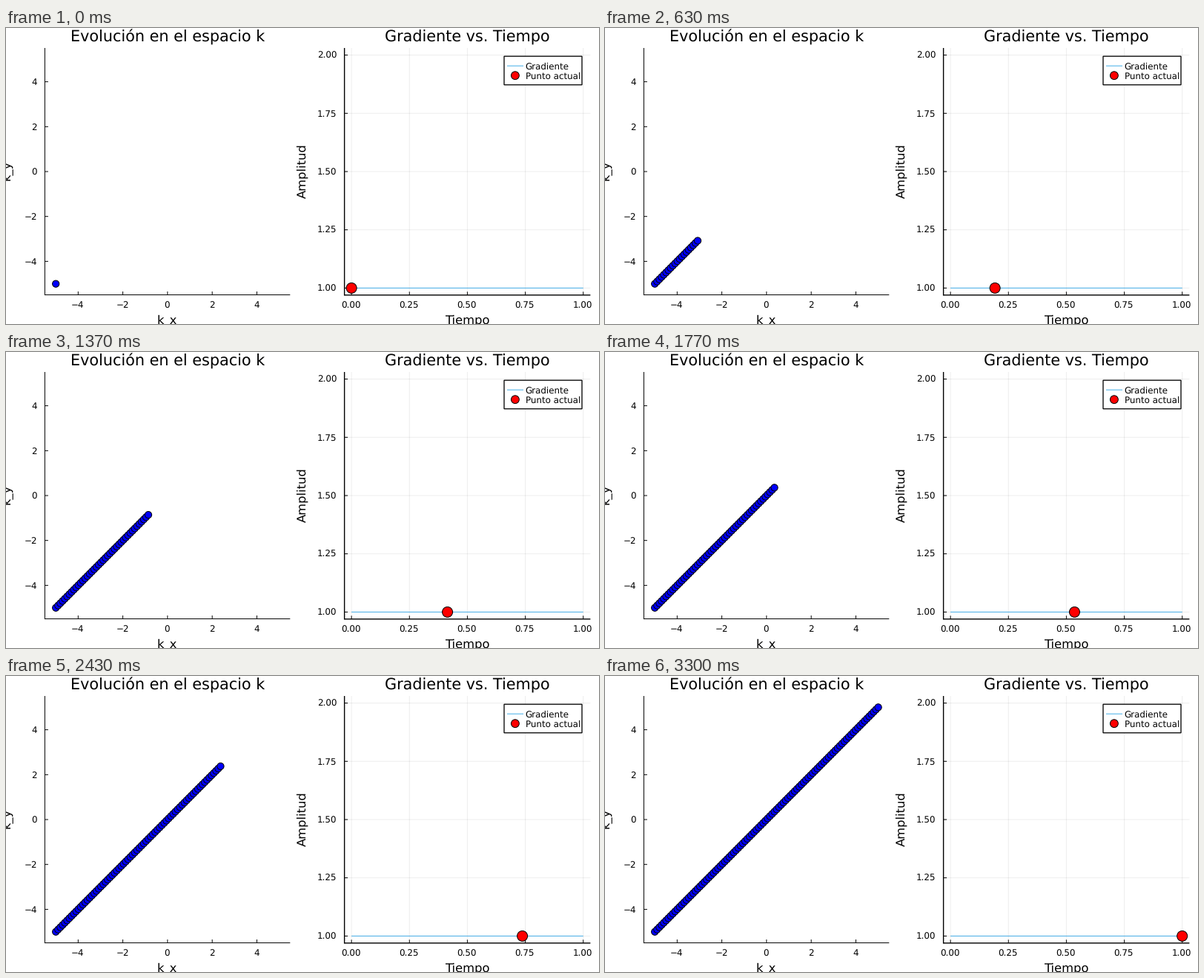
A matplotlib script for the animation above (3330 ms loop, 800 by 400 pixels).

```python
import matplotlib.pyplot as plt
from matplotlib.animation import FuncAnimation
from matplotlib.patches import Circle, Rectangle

plt.rcParams["font.family"] = "DejaVu Sans"
plt.rcParams["text.hinting"] = "none"

W, H = 800, 400
PT = 0.72            # points per pixel at 100 dpi
STEPS = 100
TICK_MS = 10
TICKS = 333
TITLE, LABEL, SMALL = 20.8, 16.4, 11.95
TOP = 27
SKY = "#45aee8"

fig = plt.figure(figsize=(W / 100, H / 100), dpi=100, facecolor="white")
ax = fig.add_axes([0, 0, 1, 1])
ax.set_xlim(0, W)
ax.set_ylim(H, 0)
ax.set_axis_off()


def line(x0, y0, x1, y1, color="black", width=1.0, z=2, **kw):
    ax.plot([x0, x1], [y0, y1], color=color, lw=width * PT, zorder=z,
            solid_capstyle="butt", snap=False, **kw)


def text(x, y, s, size, ha="center", rotation=0):
    ax.text(x, y, s, fontsize=size * PT, ha=ha, va="baseline",
            rotation=rotation, rotation_mode="anchor", zorder=6)


def dot(x, y, r, color, z):
    return ax.add_patch(Circle((x, y), r, facecolor=color, edgecolor="black",
                               lw=1.0 * PT, zorder=z))


def panel(left, right, bottom, xticks, yticks, title, xlabel, ylabel,
          label_x, grid=False, width=1.0):
    """Draw one plot frame; ticks are (pixel, label) pairs."""
    mid = (left + right) / 2
    line(left, TOP, left, bottom + width / 2, width=width)
    line(left, bottom, right, bottom, width=width)
    for x, s in xticks:
        if grid:
            line(x, TOP, x, bottom, z=1, alpha=0.07)
        line(x, bottom, x, bottom - 4.5)
        text(x - 0.6, 378.4, s, SMALL)
    for y, s in yticks:
        if grid:
            line(left, y, right, y, z=1, alpha=0.07)
        line(left, y, left + 4.5, y)
        text(left - 10.3, y + 4.4, s, SMALL, ha="right")
    text(mid, 19, title, TITLE)
    text(mid - 0.7, 399.4, xlabel, LABEL)
    text(label_x, 192.7, ylabel, LABEL, rotation=90)


def kx(v):
    return 217.9 + 30.14 * v


def ky(v):
    return 194 - 30.34 * v


def tx(t):
    return 466.1 + 312.6 * t


def amp(a):
    return 351.4 - 314.8 * (a - 1)


def signed(v):
    return str(v).replace("-", "\u2212")


k_ticks = range(-4, 5, 2)
quarters = [i / 4 for i in range(5)]
panel(52.4, 383.3, 360.6,
      [(kx(v), signed(v)) for v in k_ticks],
      [(ky(v), signed(v)) for v in k_ticks],
      "Evolución en el espacio k", "k_x", "k_y", 5)
panel(456.6, 788.4, 360.9,
      [(tx(q), f"{q:.2f}") for q in quarters],
      [(amp(1 + q), f"{1 + q:.2f}") for q in quarters],
      "Gradiente vs. Tiempo", "Tiempo", "Amplitud", 405,
      grid=True, width=1.4)

line(tx(0), amp(1), tx(1), amp(1), color=SKY, z=3)

# legend
ax.add_patch(Rectangle((672, 38.2), 105, 38.6, facecolor="white", snap=False,
                       edgecolor="black", lw=1.3 * PT, zorder=4))
line(676, 51.2, 698, 51.2, color=SKY, z=5)
dot(686.9, 64.2, 5.4, "red", 5)
text(700.6, 55.5, "Gradiente", SMALL, ha="left")
text(700.6, 68.5, "Punto actual", SMALL, ha="left")

# moving parts
path = []
for i in range(STEPS):
    k = -5 + 10 * i / (STEPS - 1)
    path.append(dot(kx(k), ky(k), 4.6, "blue", 3))
current = dot(tx(0), amp(1), 7.0, "red", 5)


def update(tick):
    # steps last 100/3 ms, rounded to whole ticks
    step = min(int((tick + 0.5) * 0.3), STEPS - 1)
    for i, p in enumerate(path):
        p.set_visible(i <= step)
    current.center = (tx(step / (STEPS - 1)), amp(1))
    return path + [current]


anim = FuncAnimation(fig, update, frames=TICKS, interval=TICK_MS,
                     repeat=True, repeat_delay=0, blit=False)
plt.show()
```
